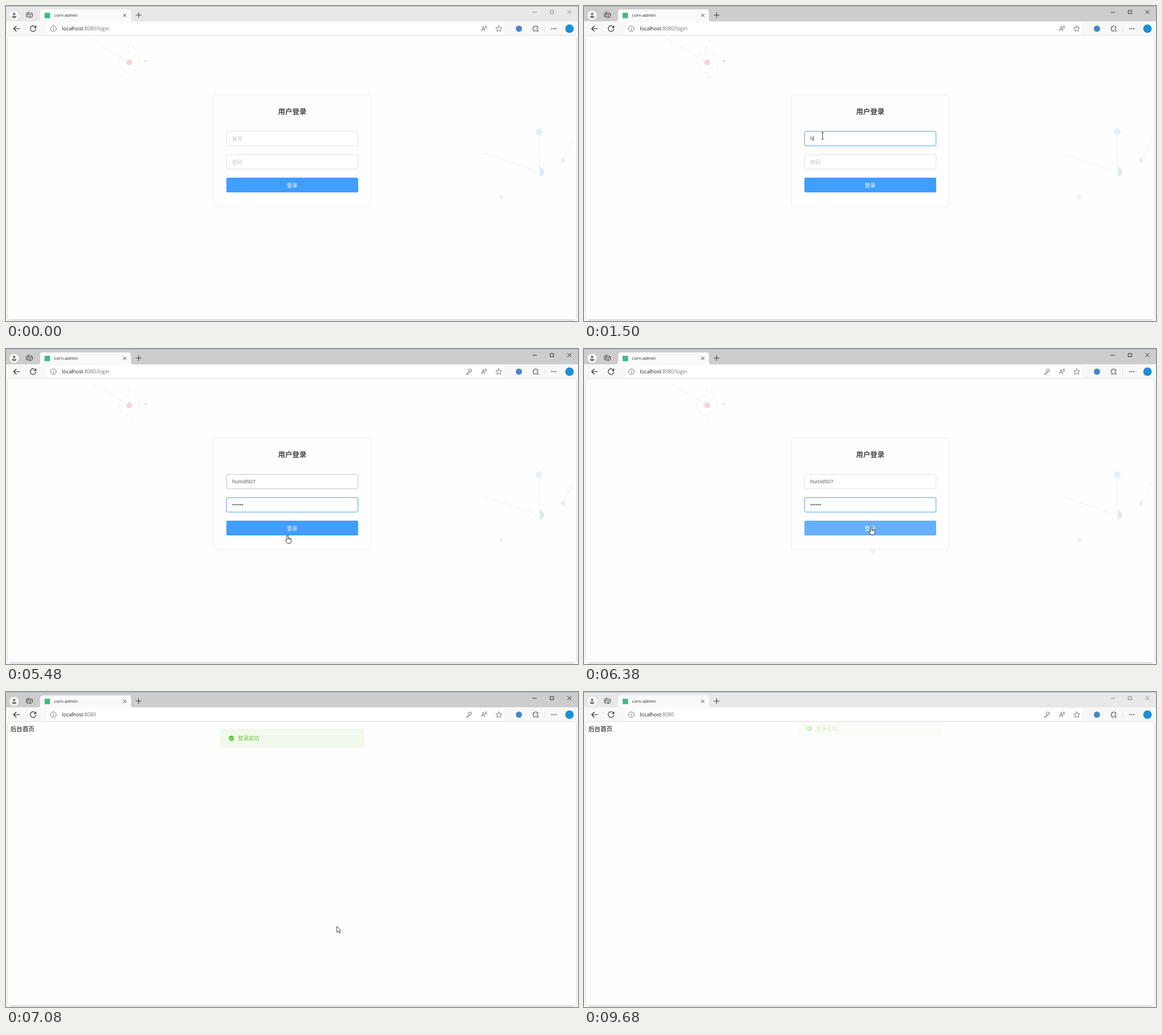
Recreate the animation shown at these times as an HTML page. Size 1007 by 556 pixels, loop 9710 ms.

```html
<!DOCTYPE html>
<html lang="zh">
<head>
<meta charset="utf-8">
<title>corn-admin</title>
<style>
  html, body { margin: 0; width: 100%; height: 100%; overflow: hidden; background: #f8f8f8; }
  svg { display: block; width: 1007px; height: 556px; }
  text { font-family: "Noto Sans CJK SC", "Noto Sans CJK", sans-serif; font-size: 9.35px; white-space: pre; }
  .ui { font-family: "Open Sans", "Noto Sans", sans-serif; }
  .field { font-family: "Liberation Sans", Arial, sans-serif; fill: #606266; }
  .hint { fill: #c0c4cc; }
  .mid { text-anchor: middle; }
  .icon { fill: none; stroke: #333; stroke-width: .9; stroke-linecap: round; stroke-linejoin: round; }
  .thin { fill: none; stroke: #dfe2e5; stroke-width: .7; }
  .input { fill: #fff; stroke: #dcdfe6; }
</style>
</head>
<body>
<svg viewBox="0 0 1007 556">
  <defs><clipPath id="view"><rect x="3" y="52.5" width="1001" height="501" rx="6"/></clipPath></defs>

  <rect width="1007" height="556" fill="#f8f8f8"/>
  <rect id="titlebar" width="1007" height="27"/>
  <rect width="1007" height="1" fill="#9eb5c3"/>
  <path d="M56 27q4 0 4-4V11q0-5 5-5h150q5 0 5 5v12q0 4 4 4z" fill="#fafafa"/>

  <!-- Tab strip -->
  <circle cx="14.3" cy="16.5" r="8" fill="#fafafa"/>
  <circle cx="14.3" cy="14" r="2.3" fill="#777"/>
  <path d="M10.3 17.5h8q0 4-4 4t-4-4z" fill="#777"/>
  <g class="icon">
    <path d="M38.5 13.5l4-2 4 2v5l-4 2-4-2zM38.5 13.5l4 2 4-2M42.500 15.500v5M36 18.500v-6l4.500-2.300M38 20.300l-2-1.800"/>
    <path d="M206.500 14l5 5m0-5l-5 5M229 16h9m-4.500-4.500v9" stroke="#222"/>
  </g>
  <rect x="68" y="12" width="9.500" height="9.500" fill="#41b883"/>
  <text class="ui" x="84.800" y="19.300" style="font-size:7.700px" fill="#222">corn-admin</text>
  <path id="controls" class="icon" d="M927.500 11h6.500M958.500 8h5.500v5.500h-5.500zM988.500 7.500l6.500 6.500m0-6.500l-6.500 6.500"/>

  <!-- Toolbar -->
  <rect x="72" y="29" width="805" height="21.500" rx="4" fill="#fff"/>
  <g class="icon">
    <path d="M13.500 40h10.500M18 35.500l-4.500 4.500 4.500 4.500" stroke="#222" stroke-width="1.100"/>
    <path d="M52.300 38a5 5 0 1 0 .3 2.800M52.600 35v3.200h-3.200" stroke="#222" stroke-width="1.100"/>
    <g stroke="#666">
      <circle cx="83.500" cy="40" r="5"/>
      <path d="M83.500 39.500v3M83.500 37.400v.1"/>
      <path d="M837 44l3-8 3 8m-5-2.600h4M843.300 35.500q1.500 1.500 0 3.500M845 34.500q2 2.500 0 5.500"/>
      <path d="M867.500 34.800l1.600 3.300 3.600.5-2.600 2.500.7 3.600-3.300-1.700-3.300 1.700.7-3.600-2.600-2.500 3.600-.5z"/>
      <g id="key"><circle cx="816.800" cy="38" r="2.700"/><path d="M814.800 39.800l-4 4v1.200h2v-1.500h1.500l1.800-2.600M817.700 37.200v.1"/></g>
    </g>
    <path d="M929 36.500h2q0-1.800 1.500-1.800t1.500 1.800h2.500v2.300q-1.800 0-1.800 1.500t1.800 1.500v2.700h-2.500q0-1.500-1.500-1.500t-1.500 1.500h-2v-3q-1.500 0-1.500-1.400t1.500-1.400z"/>
    <path d="M948.500 35.500v10" stroke="#ddd"/>
  </g>
  <text class="ui" x="98.600" y="43.200" style="font-size:8.880px" fill="#1b1b1b">localhost<tspan fill="#707070">:8080<tspan id="route">/login</tspan></tspan></text>
  <circle cx="903" cy="40" r="5.500" fill="#4587c9"/>
  <g fill="#222"><circle cx="961" cy="40" r=".9"/><circle cx="964.500" cy="40" r=".9"/><circle cx="968" cy="40" r=".9"/></g>
  <circle cx="992" cy="40" r="7.500" fill="#1b8fd8"/>

  <!-- Page -->
  <rect x="2.500" y="52" width="1002" height="502" rx="6" fill="#fefefe" stroke="#dcdcdc"/>
  <path d="M8 554h991" stroke="#c4c4c4"/>
  <g clip-path="url(#view)">
    <g id="login">
      <path class="thin" d="M147 57.500L212 96.500" stroke="#ccc"/>
      <circle class="thin" cx="217" cy="99.500" r="18" stroke="#f2f2f2" stroke-dasharray="9 4"/>
      <circle cx="217" cy="99.500" r="5" fill="#f4d3d3"/>
      <circle cx="215.500" cy="73" r="1.200" fill="#ddd"/>
      <circle cx="245.800" cy="97.200" r="1.200" fill="#b5b5b5"/>
      <circle cx="220" cy="126.500" r="1" fill="#ddd"/>
      <path class="thin" d="M938.500 228L939 285M843 261L929 289.500M982.500 268.500L1000 234"/>
      <circle cx="938.500" cy="222" r="6.200" fill="#e9eff4"/>
      <path d="M939 284.500a8.500 8.200 0 0 1 0 16.400q2-8 0-16.400z" fill="#e2e8ee"/>
      <circle cx="980.800" cy="272.300" r="3.900" fill="#eceef0"/>
      <circle cx="871.700" cy="337.400" r="3.900" fill="#f0f1f2"/>
      <circle id="bubble" cx="508.500" cy="355.500" r="5" fill="#efefef"/>

      <rect x="364.500" y="157" width="278.500" height="197" rx="6" fill="#fefefe" stroke="#e7e9ee"/>
      <text class="mid" x="504" y="191.300" style="font-size:12.500px;font-weight:700" fill="#454649">用户登录</text>
      <rect id="userBox" class="input" x="388.300" y="221.200" width="231.400" height="25.600" rx="2.600"/>
      <rect id="passBox" class="input" x="388.300" y="262.300" width="231.400" height="25.600" rx="2.600"/>
      <text id="userHint" class="hint" x="398" y="237.500">账号</text>
      <text id="passHint" class="hint" x="398" y="278.600">密码</text>
      <text id="user" class="field" x="398.200" y="237.200"></text>
      <text id="pass" class="field" x="398.200" y="278.400"></text>
      <rect id="caret" width=".8" height="10.500" fill="#333"/>
      <rect id="button" x="388" y="303" width="232" height="26" rx="2.600"/>
      <text class="mid" x="503.700" y="319.600" fill="#fff" style="font-weight:500">登录</text>
    </g>
    <text id="home" x="7.700" y="69" style="font-size:10.650px">后台首页</text>
    <g id="toast">
      <rect x="378" y="66" width="251.700" height="31.200" rx="2.600" fill="#f0f9eb" stroke="#e1f3d8" stroke-width=".8"/>
      <rect id="boxIcon" x="393" y="78.200" width="4.300" height="7" fill="none" stroke="#67c23a" stroke-width=".8"/>
      <g id="checkIcon">
        <circle cx="396.800" cy="81.700" r="4.700" fill="#67c23a"/>
        <path d="M394.500 81.800l1.700 1.700 3-3.200" fill="none" stroke="#fff"/>
      </g>
      <text id="toastText" y="85.200" fill="#67c23a">登录成功</text>
    </g>
  </g>

  <g id="pointer" stroke-linejoin="round">
    <path id="arrow" d="M.5 .5V11.300L3 9l1.700 3.800 1.600-.7L4.700 8.400H7.800z" fill="#fff" stroke="#222" stroke-width=".8"/>
    <path id="beam" d="M-2.300-5.700H-.6Q0-5.700 0-5V5q0 .7-.6.7H-2.300M2.300-5.700H.6Q0-5.700 0-5M2.300 5.700H.6Q0 5.700 0 5" fill="none" stroke="#222" stroke-width=".9"/>
    <path id="hand" d="M-1.200 9.500V1.400Q0-.5 1.300 1.400V5.500Q2.300 4.900 3 5.900 4 5.300 4.800 6.400 6.700 6 6.700 8V11L5.400 15H-.2L-3.700 10Q-4 7.800-1.200 9.500zM1.300 5.500V8M3 6V8.200M4.800 6.500V8.500" fill="#fff" stroke="#222" stroke-width=".9"/>
  </g>
</svg>

<script>
const LOOP = 9710;
const FOCUS = 760, TAB = 3330, LEAVE_FIELD = 5480, CLICK = 6380, TOAST_IN = 6590, HOME = 6830, TOAST_OUT = 9600;
const userKeys = [1500, 1630, 1830, 1960, 2150, 2470, 2710, 2990];
const passKeys = [3750, 3980, 4160, 4440, 4730, 4910];
const USER = "humid507";

const BASE = [220, 223, 230], HOVER = [192, 196, 204], BLUE = [64, 158, 255], LIGHT = [102, 177, 255], PRESSED = [58, 142, 230];
const userBorder = [[0, BASE], [540, HOVER], [FOCUS, BLUE], [TAB, HOVER], [LEAVE_FIELD, BASE]];
const passBorder = [[0, BASE], [TAB, BLUE], [CLICK, BASE]];
const buttonFill = [[0, BLUE], [LEAVE_FIELD, LIGHT], [CLICK, PRESSED], [CLICK + 90, LIGHT]];

// Pointer hot spot: time, x, y
const path = [
  [80, 900, 556], [250, 760, 470], [450, 500, 280], [600, 420, 229], [5479, 420, 229],
  [5480, 495.5, 328], [5600, 500, 320], [5990, 510.5, 307.5], [6140, 510.5, 307.5],
  [6230, 505.5, 313], [6840, 505.5, 313], [7080, 582, 413], [7360, 582, 413],
  [7440, 569, 413], [8010, 569, 413], [8390, 852, 514], [8750, 905, 557]
];

const el = {};
document.querySelectorAll("[id]").forEach(node => el[node.id] = node);

const clamp = v => Math.min(1, Math.max(0, v));
const lerp = (a, b, p) => a + (b - a) * p;
const show = (node, on) => node.style.display = on ? "" : "none";
const typed = (keys, t) => keys.filter(k => k <= t).length;

// CSS "ease": cubic-bezier(.25, .1, .25, 1)
function ease(p) {
  p = clamp(p);
  let lo = 0, hi = 1, s = p;
  for (let i = 0; i < 20; i++) {
    s = (lo + hi) / 2;
    const x = .75 * s * (1 - s) * (1 - s) + .75 * s * s * (1 - s) + s ** 3;
    if (x < p) lo = s; else hi = s;
  }
  return .3 * s * (1 - s) * (1 - s) + 3 * s * s * (1 - s) + s ** 3;
}

function colorAt(states, t, duration) {
  const i = states.findLastIndex(([start]) => start <= t);
  const [start, color] = states[i];
  const from = states[Math.max(0, i - 1)][1];
  const p = clamp((t - start) / duration);
  const smooth = p * p * (3 - 2 * p);
  return `rgb(${color.map((c, k) => Math.round(lerp(from[k], c, smooth)))})`;
}

function pointerAt(t) {
  const i = path.findIndex(([time]) => time > t);
  if (i < 1) return null;
  const [t0, x0, y0] = path[i - 1], [t1, x1, y1] = path[i];
  const p = (t - t0) / (t1 - t0);
  return [lerp(x0, x1, p), lerp(y0, y1, p)];
}

function drawPointer(t) {
  const pos = pointerAt(t);
  show(el.pointer, pos);
  if (!pos) return;
  const [x, y] = pos;
  const within = (top, bottom) => t < HOME && x > 388 && x < 620 && y > top && y < bottom;
  const kind = within(221, 247) || within(262, 288) ? "beam" : within(303, 329) ? "hand" : "arrow";
  ["arrow", "beam", "hand"].forEach(name => show(el[name], name === kind));
  el.pointer.setAttribute("transform", `translate(${x} ${y})`);
}

function drawCaret(t, nUser, nPass) {
  const inPass = t >= TAB;
  const keys = inPass ? passKeys : userKeys;
  const n = inPass ? nPass : nUser;
  const since = t - (n ? keys[n - 1] : inPass ? TAB : FOCUS + 10);
  show(el.caret, since >= 0 && t < CLICK && since % 1000 < 500);
  const width = n ? (inPass ? el.pass : el.user).getComputedTextLength() : 0;
  el.caret.setAttribute("x", 398.2 + width);
  el.caret.setAttribute("y", inPass ? 269.5 : 228.5);
}

function drawToast(t) {
  const leaving = t >= TOAST_OUT;
  const age = leaving ? t - TOAST_OUT + 46 : t - TOAST_IN;
  const visible = progress => leaving ? 1 - progress : progress;
  const ready = t >= 6900;
  show(el.toast, t >= TOAST_IN);
  el.toast.setAttribute("opacity", visible(ease(age / 300)));
  el.toast.setAttribute("transform", `translate(0 ${-31.7 * (1 - visible(ease(age / 400)))})`);
  show(el.boxIcon, !ready);
  show(el.checkIcon, ready);
  el.toastText.setAttribute("x", ready ? 408.3 : 405);
}

function render(t) {
  const active = t >= FOCUS && t < 9640;
  el.titlebar.setAttribute("fill", active ? "#cdcdcd" : "#e8e8e8");
  el.controls.style.stroke = active ? "#111" : "#777";

  const nUser = typed(userKeys, t), nPass = typed(passKeys, t);
  el.user.textContent = USER.slice(0, nUser);
  el.pass.textContent = "•".repeat(nPass);
  show(el.userHint, !nUser);
  show(el.passHint, !nPass);
  show(el.key, nPass);

  el.userBox.style.stroke = colorAt(userBorder, t, 200);
  el.passBox.style.stroke = colorAt(passBorder, t, 200);
  el.button.style.fill = colorAt(buttonFill, t, 100);

  show(el.bubble, t >= 5600);
  show(el.login, t < HOME);
  show(el.route, t < HOME);
  show(el.home, t >= HOME);

  drawCaret(t, nUser, nPass);
  drawToast(t);
  drawPointer(t);
}

const start = performance.now();
function tick() {
  render((performance.now() - start) % LOOP);
  requestAnimationFrame(tick);
}
tick();
</script>
</body>
</html>
```
